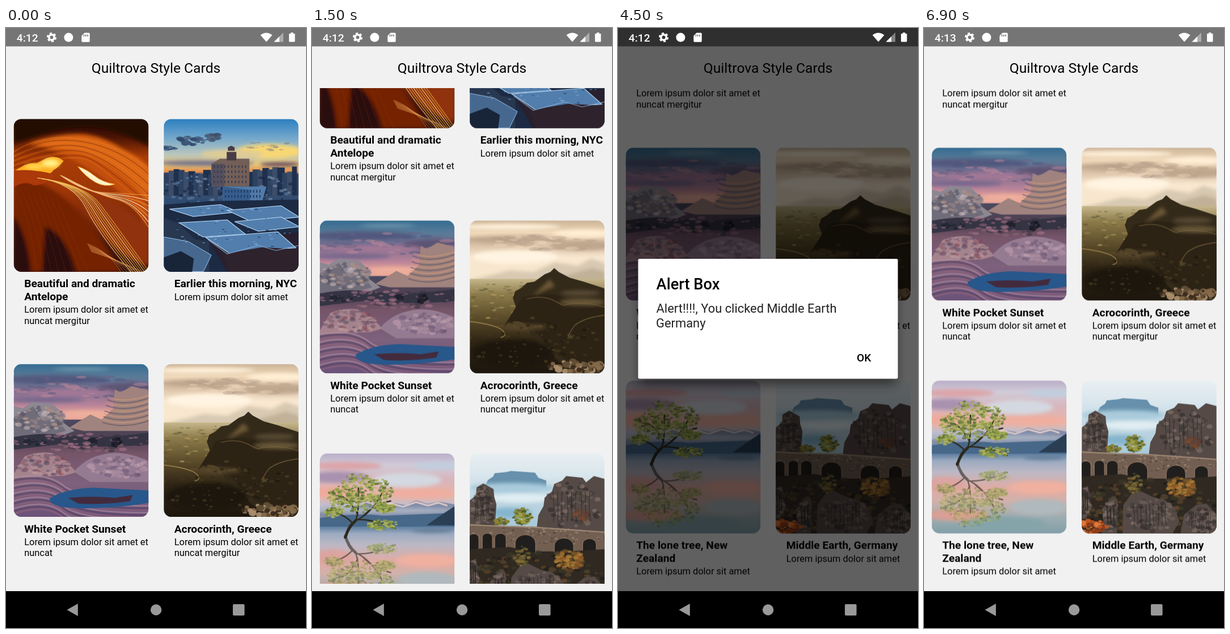
These frames come from a looping animation (529 by 1058 pixels, 7.5 s). An HTML page:

```html
<!DOCTYPE html>
<html lang="en">
<head>
<meta charset="utf-8">
<title>Style Cards</title>
<style>
  html, body { margin: 0; width: 100%; height: 100%; overflow: hidden; background: #f1f1f1; }
  svg { display: block; width: 100%; height: 100%; }
  text { font-family: Roboto, sans-serif; font-size: 16.4px; fill: #000; }
  .name { font-size: 19.2px; font-weight: 700; }
  .head { font-size: 24.65px; text-anchor: middle; }
  .clock { font-size: 19.2px; font-weight: 500; fill: #fff; }
  #feed { animation: scroll 7.5s step-end infinite; }
  #alert { animation: alert 7.5s step-end infinite; }
  #before { animation: before 7.5s step-end infinite; }
  #after { animation: after 7.5s step-end infinite; }
  @keyframes scroll {
    0% { transform: translateY(0); }
    20% { transform: translateY(-253.2px); }
    40%, 100% { transform: translateY(-381.6px); }
  }
  @keyframes alert { 0% { opacity: 0; } 60% { opacity: 1; } 80%, 100% { opacity: 0; } }
  @keyframes before { 0% { opacity: 1; } 80%, 100% { opacity: 0; } }
  @keyframes after { 0% { opacity: 0; } 80%, 100% { opacity: 1; } }
</style>
</head>
<body>
<svg viewBox="0 0 529 1058" preserveAspectRatio="none">
  <defs>
    <clipPath id="card"><rect width="237.5" height="269.5" rx="13.5"/></clipPath>
    <clipPath id="view"><rect y="106" width="529" height="874"/></clipPath>
    <filter id="soft" x="-30%" y="-60%" width="160%" height="220%"><feGaussianBlur stdDeviation="3"/></filter>
    <filter id="shadow" x="-10%" y="-20%" width="120%" height="150%"><feGaussianBlur stdDeviation="10"/></filter>
  </defs>
  <rect width="529" height="1058" fill="#f1f1f1"/>
  <rect width="529" height="32.4" fill="#757575"/>
  <text class="head" x="264.5" y="78.5">Quiltrova Style Cards</text>
  <g clip-path="url(#view)"><g id="feed"></g></g>
  <g id="alert">
    <rect width="529" height="1058" opacity=".6"/>
    <rect x="38" y="420" width="453" height="208" opacity=".5" filter="url(#shadow)"/>
    <rect x="35.5" y="407" width="458" height="211.5" rx="2.7" fill="#fff"/>
    <text x="67.6" y="460.7" font-weight="500" style="font-size:27.2px">Alert Box</text>
    <g style="--ink:#222">
      <text x="67.6" y="502" style="font-size:21.9px;fill:var(--ink)">Alert!!!!, You clicked Middle Earth</text>
      <text x="67" y="527.6" style="font-size:21.9px;fill:var(--ink)">Germany</text>
    </g>
    <text x="421" y="588.2" font-weight="500" style="font-size:19.2px">OK</text>
  </g>
  <text class="clock" id="before" x="18.8" y="23.5">4:12</text>
  <text class="clock" id="after" x="18.8" y="23.5">4:13</text>
  <g fill="#fff">
    <g fill="none" stroke="#fff">
      <circle cx="80.5" cy="16.5" r="4.7" stroke-width="3.6"/>
      <circle cx="80.5" cy="16.5" r="7.3" stroke-width="2.6" stroke-dasharray="4.1 3.545"/>
    </g>
    <circle cx="110.4" cy="16.6" r="8"/>
    <path d="M138.500 8.500H146q1.700 0 1.700 1.700V23q0 1.700-1.700 1.700H135q-1.700 0-1.700-1.700V13.700Z"/>
    <path d="M137.500 11.500v3.500M140.700 11.500v3.500M144 11.500v3.500" stroke="#757575" stroke-width="1.600"/>
    <path d="M448.700 12.500Q459 4.500 469.500 12.500L459.100 24.500Z"/>
    <path d="M489 8V24.500H472.500Z" opacity=".4"/>
    <path d="M482 15V24.500H472.500Z"/>
    <path d="M499 10h3V8h4.500v2h3v13q0 1.500-1.500 1.500h-7.500q-1.500 0-1.500-1.500Z"/>
  </g>
  <rect y="993" width="529" height="65"/>
  <g fill="#999">
    <path d="M107.500 1026L126.800 1015V1037Z"/>
    <circle cx="264.6" cy="1026" r="9.7"/>
    <rect x="400" y="1016" width="20.6" height="20" rx="2"/>
  </g>
</svg>
<script>
let seed = 7;
const random = () => (seed = seed * 16807 % 2147483647) / 2147483647;
const times = (n, draw) => Array.from({ length: n }, (_, i) => draw(i)).join('');
const shape = (d, fill, more = '') => `<path d="${d}" fill="${fill}" ${more}/>`;
const line = (d, color, width = 1, opacity = 1) =>
  `<path d="${d}" fill="none" stroke="${color}" stroke-width="${width}" opacity="${opacity}" stroke-linecap="round"/>`;
const oval = (x, y, rx, ry, fill, more = '') =>
  `<ellipse cx="${x}" cy="${y}" rx="${rx}" ry="${ry}" fill="${fill}" ${more}/>`;
const soft = (...parts) => `<g filter="url(#soft)">${parts.join('')}</g>`;

// Vertical gradient band; stops are "offset colour" pairs.
let bands = 0;
function band(y, height, ...stops) {
  const id = 'band' + bands++;
  const marks = stops.map(s => s.split(' ')).map(([o, c]) => `<stop offset="${o}" stop-color="${c}"/>`).join('');
  return `<linearGradient id="${id}" x2="0" y2="1">${marks}</linearGradient>
    <rect y="${y}" width="238" height="${height}" fill="url(#${id})"/>`;
}

// Random small marks inside an ellipse.
const scatter = (n, cx, cy, rx, ry, colors, size, opacity = .7, flat = .6) => times(n, i => {
  const a = random() * 6.283, r = Math.sqrt(random()), s = size * (.5 + random());
  return oval((cx + rx * r * Math.cos(a)).toFixed(1), (cy + ry * r * Math.sin(a)).toFixed(1),
    s.toFixed(1), (s * flat).toFixed(1), colors[i % colors.length], `opacity="${opacity}"`);
});

const canyon = () => band(0, 270, '0 #210904', '.12 #4a1404', '.25 #a83c06', '.48 #9d3607', '.7 #70230a', '1 #260c08')
  + soft(
    shape('M0 60Q45 28 110 26T237 95V190Q180 105 90 65T0 78Z', '#c4500a'),
    shape('M30 42Q110 12 190 52T240 120V148Q175 62 90 54Z', '#dc6812'),
    shape('M0 105Q55 105 100 150T190 270H0Z', '#742206'),
    shape('M0 170Q25 210 30 270H0ZM55 190Q90 200 110 270H50Z', '#2a0b07'),
    shape('M100 120Q180 140 240 190V260Q165 240 100 120Z', '#8f320b'),
    shape('M0 0H238V48Q150-4 65 22T0 46Z', '#240a04'))
  + times(9, i => line(`M0 ${58 + i * 4}Q${50 + i * 7} ${25 + i * 4} ${120 + i * 2} ${35 + i * 5}T238 ${88 + i * 9}`, i % 2 ? '#611b04' : '#ed7c1c', 1.5, .4))
  + times(8, i => line(`M${5 + i * 10} ${130 + i}Q${30 + i * 10} ${175 + i * 4} ${40 + i * 13} 270`, '#b94811', 1, .22))
  + shape('M3 91Q24 76 40 78L58 69Q75 63 88 74Q78 86 70 90Q66 98 55 96Q35 88 3 91Z', '#ffae20')
  + soft(oval(65, 78, 15, 7, '#fff28a'), oval(36, 84, 17, 4, '#ffdc55'))
  + shape('M0 92Q40 88 72 98Q60 116 35 117Q20 108 0 120Z', '#ab390a')
  + shape('M113 84Q127 88 142 100T178 115Q160 121 143 111T113 84Z', '#fff1c8', 'stroke="#f8a832"')
  + times(9, i => line(`M${42 + i * 3} ${104 + i * .5}Q${105 + i * 3} ${112 + i} ${128 + i * 3} ${158 - i}T${207 + i * 4} 270`, i % 3 ? '#eeb03f' : '#fff0ad', 1.2, .75))
  + times(7, i => line(`M${82 + i * 2} ${99 + i}Q${120 + i * 5} ${128 + i} ${164 + i * 3} ${130 + i * 2}T240 ${135 + i * 10}`, i % 2 ? '#fff0d5' : '#ee9a47', 1.3, .8))
  + times(8, i => line(`M${130 + i} ${220 + i * 2}Q${170 + i * 2} ${235 + i * 2} ${190 + i * 6} 272`, '#eba35b', 1, .6));

const roof = (x, y, w, h, slant) => shape(`M${x} ${y}L${x + w} ${y - slant}L${x + w + 32} ${y + h - slant}L${x + 42} ${y + h}Z`, '#527ead', 'stroke="#a9cae9" stroke-width="1.3"');
const city = () => band(0, 270, '0 #2c7fc0', '.12 #71a6cb', '.23 #b9c6bd', '.3 #e7c476', '.345 #e48e4c', '.36 #53566f', '.55 #2c4a70', '1 #182741')
  + soft(oval(187, 57, 60, 13, '#f7d773'), oval(120, 62, 55, 8, '#dfcc95'), oval(74, 78, 85, 5, '#75728d'), oval(205, 80, 35, 4, '#674d61'))
  + scatter(30, 48, 38, 23, 8, ['#405779', '#31496a'], 5, .7, .5)
  + scatter(25, 85, 32, 13, 6, ['#3c4e6b', '#53647d'], 5, .7, .5)
  + scatter(12, 10, 51, 12, 3, ['#314e74'], 4, .7, .4)
  + scatter(20, 185, 47, 40, 9, ['#7f8791', '#a58f78'], 4, .5, .3)
  + times(28, i => {
    const top = 82 + random() * 16;
    return `<rect x="${i * 8.700}" y="${top}" width="${6 + random() * 8}" height="${135 - top}" fill="${['#2d4260', '#3d4d69', '#1f304d'][i % 3]}"/>`;
  })
  + scatter(150, 118, 125, 122, 30, ['#5a7ba1', '#15263f', '#7c91a9', '#304e73'], 3, .6)
  + shape('M84 79L99 70H151V119H84Z', '#735f58') + shape('M84 79H107V119H84Z', '#55505d')
  + shape('M111 73V58H128V73ZM113 56V50L119 47L125 50V56Z', '#493d46')
  + times(40, i => `<rect x="${88 + i % 10 * 6.2}" y="${82 + (i / 10 | 0) * 9}" width="2" height="4" fill="#343a50"/>`)
  + shape('M104 119H181L170 158L104 147Z', '#527ba9') + shape('M104 119L152 125V158L104 147Z', '#385e8d')
  + times(36, i => `<rect x="${108 + i % 12 * 5.5}" y="${125 + (i / 12 | 0) * 9}" width="2" height="5" fill="#1e3d66"/>`)
  + shape('M0 151L80 145L238 142V270H0Z', '#1c2a43')
  + roof(10, 159, 90, 13, 8) + roof(112, 161, 95, 20, 8) + roof(27, 183, 85, 25, 5) + roof(125, 181, 82, 17, 8)
  + shape('M0 174L26 184L55 212L80 216V270H0Z', '#273850')
  + shape('M78 213L240 200V270H112Z', '#28202e')
  + roof(74, 209, 127, 28, 10)
  + shape('M0 208L43 216L84 240L70 269H0Z', '#46688f', 'stroke="#9ac1e8"')
  + shape('M0 244L30 233L53 246L50 270H0Z', '#182438')
  + shape('M105 238L174 226L238 230V270H116Z', '#2e222c')
  + line('M78 213L112 238L167 223L198 232L238 223', '#91b8df', 1.4, .7)
  + scatter(55, 118, 196, 110, 42, ['#91bbe4', '#192c49', '#77a5d2'], 2.3, .65, .35);

const desert = () => band(0, 110, '0 #356d92', '.2 #597b98', '.4 #766a8d', '.65 #b88399', '.85 #efaa96', '1 #b9899d')
  + soft(oval(70, 27, 95, 8, '#53587e'), oval(200, 44, 55, 11, '#5d5475'), oval(100, 50, 80, 7, '#a17895'), oval(55, 63, 70, 5, '#76688d'), oval(120, 9, 50, 2, '#83a4b5'), oval(130, 87, 45, 5, '#f0b19e'))
  + scatter(45, 118, 40, 120, 20, ['#c2899c', '#695f80', '#49547c'], 9, .45, .25)
  + band(98, 172, '0 #4a4961', '.2 #504050', '.35 #765569', '.65 #7d617d', '1 #6b5279')
  + shape('M0 74L16 78L33 67L68 70L91 91L87 103L107 118L81 128H0Z', '#8d8792')
  + shape('M0 94L34 75L51 100L66 82L92 118L56 128H0Z', '#64616f', 'opacity=".7"')
  + shape('M98 112L135 89L155 98L175 79L178 45L189 50L208 39L238 47V118H123Z', '#a0837e')
  + times(10, i => line(`M${157 + i} ${103 - i * 5}Q195 ${115 - i * 5} 238 ${100 - i * 5}`, i % 2 ? '#d39a76' : '#5f5360', 2, .65))
  + scatter(80, 46, 97, 47, 23, ['#bfb3b6', '#555363', '#97828b', '#b5937f'], 4, .6)
  + shape('M0 129Q48 119 98 126T238 121V142Q150 150 85 141L0 151Z', '#353444')
  + scatter(80, 118, 139, 122, 16, ['#8c6375', '#a9768a', '#36323e'], 5, .6, .4)
  + scatter(24, 181, 138, 8, 8, ['#191c28', '#27232d'], 3, .9)
  + scatter(14, 141, 136, 9, 4, ['#23232e'], 3, .9)
  + scatter(20, 38, 137, 20, 5, ['#232735'], 3, .9)
  + shape('M106 190Q128 165 156 160Q190 150 238 171V208H135Z', '#957b92')
  + shape('M0 194L19 163Q45 153 67 157Q88 163 110 191L89 197L0 201Z', '#a4838d')
  + scatter(90, 55, 178, 49, 20, ['#76566b', '#c09a9c', '#934f58', '#544a62'], 4, .5)
  + scatter(60, 185, 183, 52, 19, ['#b393a6', '#695472', '#c4a4b2'], 5, .5)
  + times(15, i => line(`M0 ${201 + i * 4.500}Q55 ${189 + i * 4} 87 ${214 + i * 4}T238 ${238 + i * 4}`, ['#b18c9e', '#574565', '#93657b'][i % 3], 3, .6))
  + shape('M63 237Q90 220 140 218L238 223V245Q170 256 105 254Q63 252 63 237Z', '#28578b')
  + shape('M96 236Q140 232 178 236L210 231L205 242Q155 249 113 246Z', '#432b3e');

const hill = () => band(0, 120, '0 #ccb498', '.18 #f1d9ba', '.35 #d9c0a5', '.55 #fae8d1', '.85 #f6e7cc', '1 #d4c8a8')
  + soft(oval(80, 34, 90, 7, '#bda58e'), oval(200, 44, 60, 9, '#bfa78f'), oval(70, 11, 90, 5, '#fff1da'), oval(202, 23, 55, 7, '#ffefd5'), oval(80, 64, 75, 12, '#fff4e1'))
  + scatter(45, 140, 37, 120, 16, ['#f9e1c1', '#ad9783'], 10, .32, .25)
  + soft(shape('M0 106L70 88L112 91L150 74L190 80L215 67L240 76V125H0Z', '#d8c9b2'), shape('M155 101L215 84L240 91V120H160Z', '#c0b197'))
  + band(103, 167, '0 #c7b78d', '.16 #8d7c4b', '.4 #5d4d2b', '.65 #302615', '1 #1c160d')
  + scatter(130, 63, 145, 105, 37, ['#6c6237', '#a99056', '#4d4a2c', '#c0a866'], 4, .45, .3)
  + shape('M76 137L80 125L91 119L101 110L114 108L132 95L142 91L149 84L157 91L176 101L201 108L238 120V270H181L111 207L81 152Z', '#342a1a')
  + shape('M92 136Q142 122 172 139T238 154V252Q171 264 130 212T60 187Z', '#2c2315')
  + soft(oval(198, 144, 40, 6, '#685738'), oval(96, 188, 40, 5, '#55452a'), shape('M111 133L141 104L163 133L150 116Z', '#6d5835'), oval(76, 233, 72, 22, '#1a150d'), oval(195, 128, 35, 5, '#8d7b5c', 'opacity=".4"'))
  + line('M101 138Q130 131 150 142T170 148Q205 142 238 153', '#94784b', 1.2, .55)
  + line('M238 167Q202 171 185 185Q165 212 183 203', '#8d7045', 1.5, .6)
  + line('M0 178Q48 184 58 194Q67 204 55 206', '#b19459', 1.6, .7)
  + scatter(100, 108, 215, 120, 44, ['#4c3d23', '#19140c', '#65512e'], 3, .45)
  + scatter(55, 190, 258, 51, 11, ['#ad9270', '#655038', '#866b49', '#39291b'], 5, .9, .8);

// Branches and leaves, reused upside down for the reflection.
const tree = () => line('M47 144Q49 126 63 119Q70 101 68 61M63 119Q93 105 112 66M66 117Q91 115 133 132M67 108Q49 75 33 75M75 112Q97 89 125 84M58 123Q38 103 18 105', '#2d291d', 2.4)
  + line('M45 148Q51 129 63 119', '#2d291d', 5)
  + [[67, 55, 28, 20], [105, 68, 25, 23], [37, 77, 24, 20], [75, 88, 30, 17], [25, 104, 17, 8], [111, 126, 27, 9], [115, 96, 17, 8]]
    .map(a => scatter(110, ...a, ['#819443', '#a4ae51', '#5d7139', '#b5b75f'], 2.6, .8)).join('');
const lake = () => {
  const tall = tree();
  return band(0, 130, '0 #baafc8', '.16 #d1cbd8', '.35 #d8b6bd', '.58 #e9b5a7', '.7 #c0bdcd', '1 #8495b0')
    + soft(oval(45, 22, 65, 7, '#dca4a9'), oval(30, 42, 55, 10, '#a892b0'), oval(154, 47, 60, 13, '#d4d8e0'), oval(176, 70, 60, 9, '#efaea0'), oval(28, 69, 55, 10, '#eeab9d'), oval(207, 22, 42, 7, '#c1cede'))
    + shape('M0 104L25 96L51 102L82 87L109 97L133 88L151 91L170 83L190 89L210 85L238 90V125H0Z', '#818ca7')
    + line('M98 92L127 89L147 94L170 86L191 92L209 87L224 92', '#f6d9d3', 3, .8)
    + soft(oval(116, 101, 130, 5, '#aab3c4'))
    + shape('M0 114Q67 104 111 110L238 105V128H0Z', '#486889')
    + shape('M188 127Q213 109 238 93V128Z', '#2a3e54')
    + band(127, 143, '0 #53759a', '.1 #9baac0', '.24 #bcb8c5', '.44 #dfaca4', '.6 #d2b1ab', '.8 #9cadb1', '1 #829fa8')
    + soft(oval(190, 189, 55, 12, '#efb0a0'), oval(24, 184, 35, 14, '#dca4a0'), oval(45, 237, 55, 11, '#da9f95'), oval(189, 223, 52, 14, '#b0b9bd'), oval(127, 253, 75, 13, '#85a4aa'), oval(198, 136, 36, 4, '#657f99'))
    + `<g transform="translate(0 294) scale(1 -1)" opacity=".6">${tall}</g>`
    + line('M0 128H238', '#355a7d', 1.5, .7) + tall;
};

// Cracked rock: an outline with dark and light marks clipped by position.
const crag = (d, x, y, rx, ry) => shape(d, '#554a46')
  + scatter(80, x, y, rx, ry, ['#817067', '#37302e', '#6f6059', '#46403d'], 4, .7, .7)
  + times(9, i => line(`M${x - rx * .7 + i * rx / 6} ${y - ry * .6}q${3 - i % 3 * 3} ${ry * .6} 1 ${ry * 1.200}`, '#2a2524', 1.5, .55));
const bridge = () => band(0, 160, '0 #e9eff2', '.25 #d8e6ed', '.5 #bfd6e2', '.8 #a9c9d9', '1 #b8ced7')
  + shape('M32 47L41 41L44 35L64 33L73 31L115 34L121 43L135 48V61H25Z', '#6690ac')
  + soft(oval(75, 61, 75, 9, '#a9cbdc'), oval(90, 79, 55, 8, '#e0eef3'), oval(70, 105, 40, 9, '#85b5ce'))
  + crag('M0 83L11 74L12 60L24 53L42 63L43 76L47 90L44 133L0 144Z', 22, 96, 20, 36)
  + crag('M118 132L121 109L130 93L132 78L145 67L149 54L163 48L170 40L199 43L205 51L219 40L238 45V152H118Z', 181, 94, 49, 44)
  + shape('M0 129L45 132L111 132L238 144V270H0Z', '#292420')
  + scatter(90, 94, 111, 17, 15, ['#878330', '#4e5a27', '#a0a044'], 3, .85)
  + scatter(45, 56, 120, 12, 7, ['#8f8030', '#5b652d'], 3, .8)
  + shape('M0 124L44 127L110 129L238 138V173H0Z', '#725f52')
  + scatter(140, 118, 146, 121, 16, ['#907967', '#514239', '#a18a76'], 2, .65)
  + line('M0 126L42 128L110 130L238 139', '#a58d78', 2)
  + [[7, 149, 9], [31, 148, 9], [54, 149, 10], [98, 158, 18], [166, 163, 17], [211, 160, 12]]
    .map(([x, y, r]) => shape(`M${x - r} ${y + 25}V${y}A${r} ${r * .8} 0 0 1 ${x + r} ${y}V${y + 25}Z`, '#211f1d', 'stroke="#9b806a"')).join('')
  + shape('M0 169L70 165L120 176L238 169V270H0Z', '#302921')
  + scatter(180, 118, 220, 118, 48, ['#5c4c31', '#1d1c18', '#3b3b29', '#69482c'], 5, .6)
  + crag('M35 270L42 220L53 206L63 211L62 270Z', 51, 238, 11, 28)
  + crag('M72 270L73 220L88 199L104 195L125 205L147 211L164 225L172 248L160 270Z', 121, 237, 43, 31)
  + crag('M174 270L180 237L202 219L220 217L238 238V270Z', 211, 247, 26, 22)
  + crag('M0 190L11 186L16 218L8 244H0Z', 6, 214, 7, 25)
  + scatter(80, 176, 188, 26, 17, ['#99602a', '#705326', '#b38238'], 4, .75)
  + scatter(45, 92, 181, 13, 18, ['#877038', '#58552c'], 3, .75)
  + scatter(65, 20, 258, 23, 14, ['#bd541f', '#df793b', '#8a391a'], 4, .85)
  + scatter(22, 194, 109, 14, 10, ['#79462c', '#614033'], 4, .7);

const both = ['Lorem ipsum dolor sit amet et', 'nuncat mergitur'];
const short = ['Lorem ipsum dolor sit amet'];
const cards = [
  [canyon, ['Beautiful and dramatic', 'Antelope'], both],
  [city, ['Earlier this morning, NYC'], short],
  [desert, ['White Pocket Sunset'], [both[0], 'nuncat']],
  [hill, ['Acrocorinth, Greece'], both],
  [lake, ['The lone tree, New', 'Zealand'], short],
  [bridge, ['Middle Earth, Germany'], short]
];
const rowTops = [160.4, 592.6, 1003.2];

document.getElementById('feed').innerHTML = cards.map(([photo, title, body], i) => {
  const bodyTop = 297 + title.length * 22.5;
  const rows = (lines, top, gap, kind) => lines.map((s, n) =>
    `<text class="${kind}" x="18.5" y="${top + n * gap}">${s}</text>`).join('');
  return `<g transform="translate(${i % 2 ? 278.2 : 13.7} ${rowTops[i >> 1]})">
    <g clip-path="url(#card)">${photo()}</g>
    ${rows(title, 297, 22.5, 'name')}${rows(body, bodyTop, 19.4, 'body')}</g>`;
}).join('');
</script>
</body>
</html>
```
